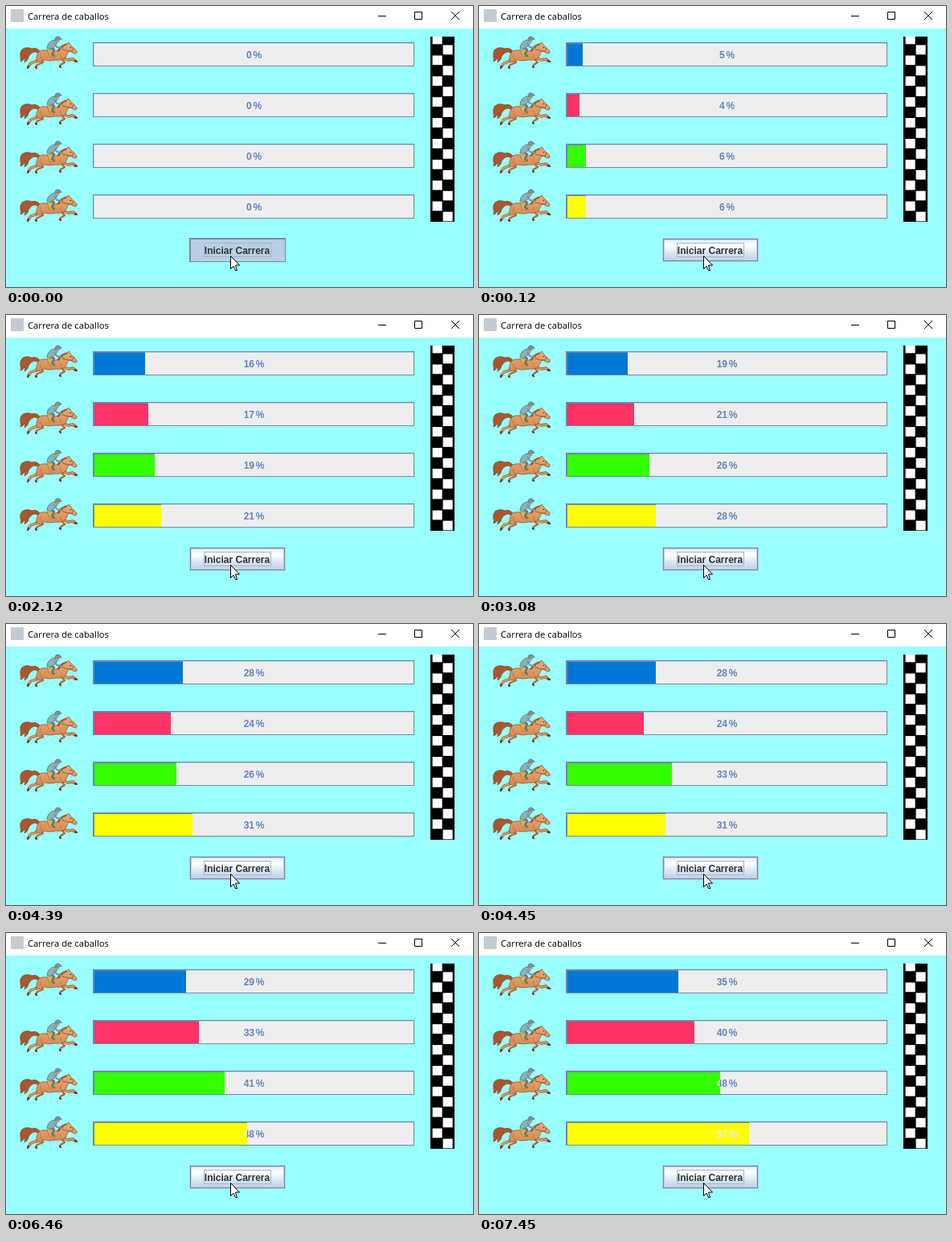
An HTML page for the animation above (8 s loop, 581x349 px).

```html
<!DOCTYPE html>
<html lang="es">
<head>
<meta charset="utf-8">
<title>Carrera de caballos</title>
<style>
  html, body { margin: 0; width: 100%; height: 100%; overflow: hidden; background: #9ff; }
  svg { display: block; width: 581px; height: 349px; }
  .label { font: bold 12px "Liberation Sans", Arial, sans-serif; text-anchor: middle; }
  .percent { word-spacing: -1.5px; }
  .title { font: 11.25px "Open Sans", "Noto Sans", sans-serif; }
</style>
</head>
<body>
<svg id="stage" viewBox="0 0 581 349" xmlns="http://www.w3.org/2000/svg">
  <defs>
    <linearGradient id="gloss" x1="0" y1="0" x2="0" y2="1">
      <stop offset="0" stop-color="#dde8f3"/>
      <stop offset=".3" stop-color="#fff"/>
      <stop offset=".6" stop-color="#dde8f3"/>
      <stop offset="1" stop-color="#b8cfe5"/>
    </linearGradient>
    <linearGradient id="coat" x1="0" y1="0" x2="0" y2="1">
      <stop offset="0" stop-color="#e8ab76"/>
      <stop offset="1" stop-color="#d48a55"/>
    </linearGradient>
    <g id="horse" stroke-linejoin="round" stroke-linecap="round">
      <!-- far legs -->
      <g fill="none" stroke="#b06a3c" stroke-width="2.4">
        <path d="M43 65L46 70L39 73L37 76"/>
        <path d="M68 65L73 70L68 73L67 75"/>
      </g>
      <!-- tail -->
      <path d="M42 56Q38 51 32 53Q25 50 20 54Q17 57 18 63Q19 66 18 69Q22 68 23 64Q24 67 23 70Q28 67 28 63Q31 58 35 57Q39 57 41 60Z"
            fill="#a9572e" stroke="#83401f" stroke-width=".7"/>
      <!-- near legs -->
      <g fill="none" stroke="#96532c" stroke-width="3.4">
        <path d="M42 64L37 69L31 71L28 75"/>
        <path d="M70 64L77 67L83 66L86 68"/>
      </g>
      <g fill="none" stroke="#dd9862" stroke-width="2.1">
        <path d="M42 64L37 69L31 71L28 75"/>
        <path d="M70 64L77 67L83 66L86 68"/>
      </g>
      <path d="M28 75L27 77M37 76L38 77M67 75L68 76M86 68L88 69" fill="none" stroke="#5b3520" stroke-width="2"/>
      <!-- body, neck and head -->
      <path d="M40 58Q43 54 50 55Q59 58 65 55Q69 49 76 47L78 45L80 48Q83 51 88 56Q89 59 86 59Q83 59 81 56L78 56Q76 60 74 64Q70 68 62 67Q54 69 48 67Q43 70 38 70Q37 63 40 58Z"
            fill="url(#coat)" stroke="#9a592f" stroke-width=".8"/>
      <path d="M64 55Q67 48 77 46Q75 50 71 50Q72 53 68 53Q68 56 64 57Z" fill="#a9572e"/>
      <path d="M43 60Q41 65 46 67M68 60Q67 65 71 66" fill="none" stroke="#b9733f" stroke-width=".8"/>
      <circle cx="80.500" cy="51.500" r=".8" fill="#3a2114"/>
      <path d="M84 52L82 57L70 54" fill="none" stroke="#83401f" stroke-width=".7"/>
      <!-- rider -->
      <path d="M51 54L60 54L59 63L55 63Z" fill="#e0b04c" stroke="#9a6a26" stroke-width=".6"/>
      <path d="M53 50L60 54L57 60L60 62" fill="none" stroke="#6b7478" stroke-width="2.300"/>
      <path d="M51 52Q52 44 60 42L64 45L62 49L56 53Z" fill="#8fb1b5" stroke="#557479" stroke-width=".8"/>
      <path d="M60 46L63 51L69 52" fill="none" stroke="#7597a0" stroke-width="1.800"/>
      <circle cx="64.500" cy="43" r="2.300" fill="#c99a78"/>
      <path d="M61 42Q61 38 64.500 38Q67 38 69 41Z" fill="#7c979d" stroke="#4e666d" stroke-width=".7"/>
    </g>
  </defs>

  <rect width="581" height="349" fill="#9ff"/>
  <rect width="581" height="28" fill="#fff"/>
  <rect x="6" y="4" width="16" height="16" fill="#c3cbd4"/>
  <text class="title" x="27" y="17">Carrera de caballos</text>
  <g fill="none" stroke="#000">
    <path d="M463 12.500H473M508.500 7.500H517.500V16.500H508.500Z"/>
    <path d="M554 7L564 17M564 7L554 17"/>
  </g>

  <g id="lanes"></g>
  <g id="flag"><rect x="528" y="38" width="30" height="230"/></g>

  <g id="pressed" fill="none" stroke="#7a8a99">
    <rect x="228.500" y="288.500" width="119" height="29" fill="#b8cfe5"/>
    <path d="M229.500 317V289.500H347"/>
  </g>
  <g id="hovered" fill="none" stroke="#b8cfe5">
    <rect x="228.500" y="288.500" width="119" height="29" fill="url(#gloss)"/>
    <rect x="229.500" y="289.500" width="117" height="27" stroke="#7a8a99"/>
    <rect x="230.500" y="290.500" width="115" height="25"/>
  </g>
  <rect x="246.500" y="294.500" width="83" height="17" fill="none" stroke="#a3b8cc"/>
  <text class="label" x="287.500" y="308" fill="#333">Iniciar Carrera</text>
  <path d="M279.500 310.500V326.500L283 323L285.500 328.500H287.500L285.500 322H290.500Z" fill="#fff" stroke="#000"/>
</svg>
<script>
const LOOP = 8000;
const PRESS_END = 70;
const BAR = { x: 108, y: 45, width: 400, height: 30, gap: 63 };
const COLORS = ["#0078d7", "#ff3366", "#33ff00", "#ffff00"];
const HORSE_OFFSETS = [0, 70, 130, 190];

// Start time in ms, then the progress of each lane in percent.
const STEPS = [
  [0, 0, 0, 0, 0],
  [70, 5, 4, 0, 6],
  [120, 5, 4, 6, 6],
  [1110, 13, 8, 6, 14],
  [1180, 13, 8, 12, 14],
  [2120, 16, 17, 19, 21],
  [3080, 19, 21, 26, 28],
  [4390, 28, 24, 26, 31],
  [4450, 28, 24, 33, 31],
  [5390, 29, 28, 40, 40],
  [6460, 29, 33, 41, 48],
  [7380, 35, 40, 41, 57],
  [7450, 35, 40, 48, 57]
];

const byId = id => document.getElementById(id);

function set(node, attrs) {
  for (const name in attrs) node.setAttribute(name, attrs[name]);
  return node;
}

function add(parent, tag, attrs) {
  const node = document.createElementNS("http://www.w3.org/2000/svg", tag);
  return parent.appendChild(set(node, attrs));
}

function makeLane(color, i) {
  const root = byId("lanes");
  const { x, width, height } = BAR;
  const y = BAR.y + i * BAR.gap;
  const inner = { x: x + 1, y: y + 1, height: height - 2 };
  const label = { class: "label percent", x: x + width / 2 + .6, y: y + 20 };
  const edge = { d: `M${x + 1.5} ${y + height - 1}V${y + 1.5}H${x + width - 1}`, fill: "none" };

  add(root, "use", { href: "#horse", y: HORSE_OFFSETS[i] });
  add(root, "rect", { x: x + .5, y: y + .5, width: width - 1, height: height - 1, fill: "#eee", stroke: "#7a8a99" });
  add(root, "path", { ...edge, stroke: "#b8cfe5" });
  const clip = add(root, "clipPath", { id: "clip" + i });
  const clipRect = add(clip, "rect", inner);
  const base = add(root, "text", { ...label, fill: "#6382bf" });

  const filled = add(root, "g", { "clip-path": `url(#clip${i})` });
  add(filled, "rect", { ...inner, width: width - 2, fill: color });
  add(filled, "path", { ...edge, stroke: "#6382bf" });
  const over = add(filled, "text", { ...label, fill: "#eee" });

  return percent => {
    set(clipRect, { width: Math.round((width - 2) * percent / 100) });
    base.textContent = over.textContent = percent + " %";
  };
}

// White tiles, slightly smaller than their cells, on the black strip.
function drawFlag() {
  const pitch = 12.94;
  for (let row = 0; row < 18; row++) {
    const top = Math.max(38, 35.6 + row * pitch);
    const bottom = 34.4 + (row + 1) * pitch;
    const x = row % 2 ? 543.6 : 530.6;
    add(byId("flag"), "rect", { x, y: top, width: 12, height: bottom - top, fill: "#fff" });
  }
}

const lanes = COLORS.map(makeLane);
drawFlag();

function render(time) {
  const step = STEPS.filter(([start]) => start <= time).pop();
  lanes.forEach((setPercent, i) => setPercent(step[i + 1]));
  const pressed = time < PRESS_END;
  set(byId("pressed"), { visibility: pressed ? "visible" : "hidden" });
  set(byId("hovered"), { visibility: pressed ? "hidden" : "visible" });
}

const origin = performance.now();
function tick() {
  render((performance.now() - origin) % LOOP);
  requestAnimationFrame(tick);
}
tick();
</script>
</body>
</html>
```
